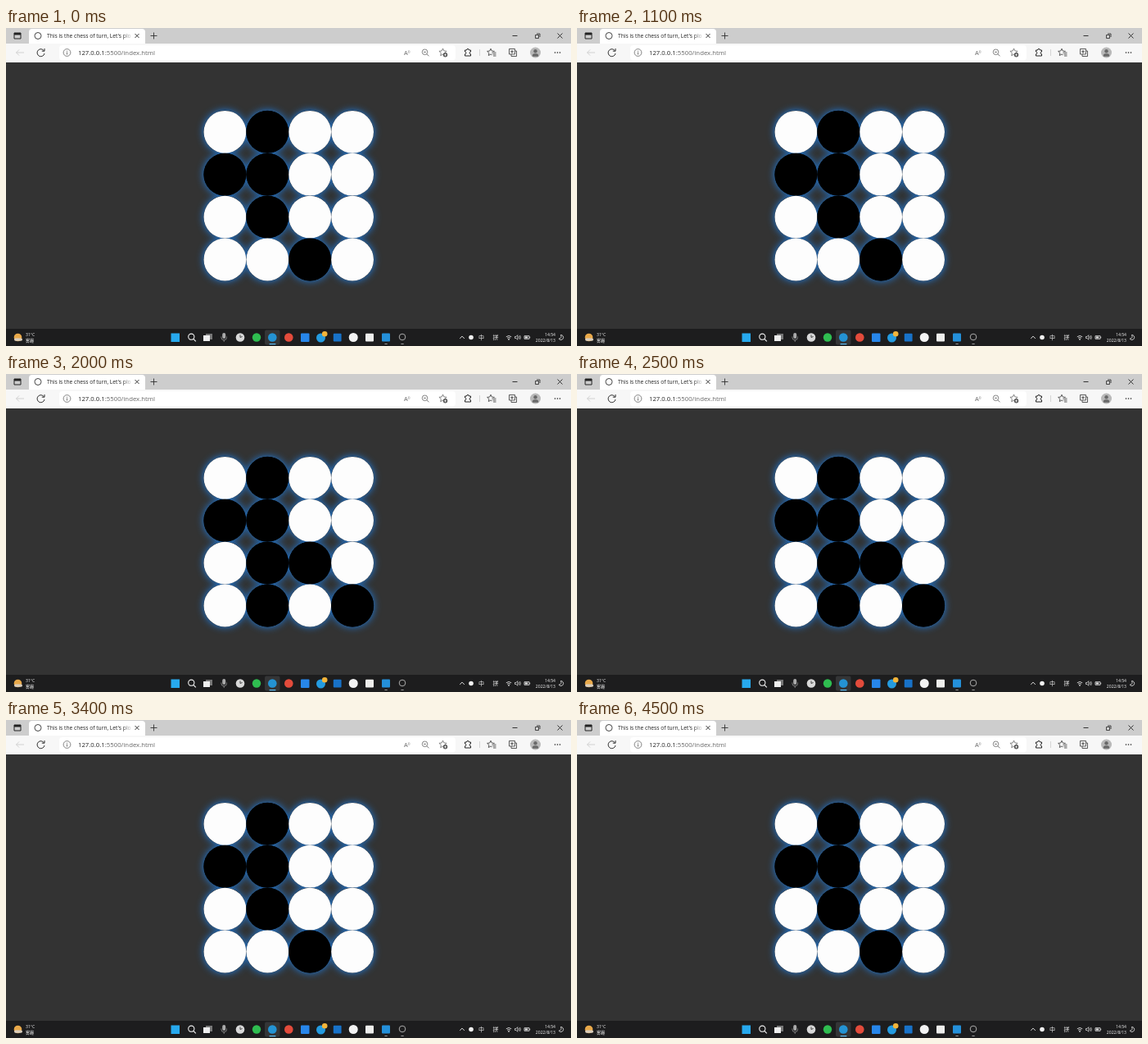
An HTML page with a canvas that plays this animation: 690x388 px, repeating every 5 s.

```html
<!DOCTYPE html>
<html lang="en">
<head>
<meta charset="utf-8">
<title>Chess of turn</title>
<style>
  html, body { margin: 0; width: 100%; height: 100%; overflow: hidden; background: #333; }
  canvas { position: absolute; left: 0; top: 0; }
  span { position: absolute; white-space: pre; line-height: 10px; font-family: "Open Sans", "Noto Sans CJK SC", "Noto Sans CJK", sans-serif; }
  .title { left: 50px; top: 4.5px; width: 103px; overflow: hidden; font-size: 6.7px; color: #222; }
  .title::after { content: ""; position: absolute; right: 0; top: 0; width: 10px; height: 10px; background: linear-gradient(90deg, #fff0, #fffd); }
  .url { left: 88px; top: 25px; font-size: 7.76px; color: #666; }
  .url b { font-weight: 400; color: #222; }
  .read { left: 486px; top: 25px; font-size: 7.5px; color: #666; }
  .bar { color: #f4f4f4; font-size: 5.1px; }
  .ime { color: #f4f4f4; font-size: 7px; top: 372.5px; }
</style>
</head>
<body>
<canvas id="stage" width="690" height="388"></canvas>
<span class="title">This is the chess of turn, Let's plo</span>
<span class="url"><b>127.0.0.1</b>:5500/index.html</span>
<span class="read">A<small>⁾⁾</small></span>
<span class="bar" style="left:24px;top:369px">31°C</span>
<span class="bar" style="left:24px;top:376px">雾霾</span>
<span class="ime" style="left:577px">中</span>
<span class="ime" style="left:594.5px">拼</span>
<span class="bar" style="right:auto;left:640px;width:31px;text-align:right;top:369px">14:54</span>
<span class="bar" style="left:640px;width:31px;text-align:right;top:376px">2022/8/13</span>
<script>
const ctx = document.getElementById("stage").getContext("2d");

function rect(x, y, w, h, color, r = 0) {
  ctx.fillStyle = color;
  ctx.beginPath();
  ctx.roundRect(x, y, w, h, r);
  ctx.fill();
}

function circle(x, y, r, color) {
  ctx.fillStyle = color;
  ctx.beginPath();
  ctx.arc(x, y, r, 0, Math.PI * 2);
  ctx.fill();
}

function ring(x, y, r, color, width = 0.9) {
  ctx.strokeStyle = color;
  ctx.lineWidth = width;
  ctx.beginPath();
  ctx.arc(x, y, r, 0, Math.PI * 2);
  ctx.stroke();
}

// Stroke an SVG path centred on (x, y).
function line(x, y, d, color = "#333", width = 0.9) {
  ctx.save();
  ctx.translate(x, y);
  ctx.strokeStyle = color;
  ctx.lineWidth = width;
  ctx.stroke(new Path2D(d));
  ctx.restore();
}

function star(x, y, r, color) {
  ctx.strokeStyle = color;
  ctx.lineWidth = 0.8;
  ctx.beginPath();
  for (let i = 0; i < 10; i++) {
    const a = i * Math.PI / 5 - Math.PI / 2, k = i % 2 ? r * 0.48 : r;
    ctx.lineTo(x + k * Math.cos(a), y + k * Math.sin(a));
  }
  ctx.closePath();
  ctx.stroke();
}

function drawTabs() {
  rect(0, 0, 690, 20, "#cdcdcd");
  rect(28, 1, 142, 22, "#fff", 4);
  line(14, 9.5, "M-4-3.5H4V3.5H-4Z", "#222", 1);
  rect(10, 6, 8, 2.5, "#222");
  ring(39, 9.5, 4, "#444", 1);
  line(160, 9.5, "M-2.5-2.5L2.5 2.5M2.5-2.5L-2.5 2.5", "#222");
  line(180.5, 9.5, "M-4 0H4M0-4V4", "#333");
  line(621.5, 9.5, "M-3 0H3", "#222");
  line(649, 9.5, "M-2.5-1H1.5V3H-2.5ZM-1-2.5H3V1.5", "#222", 0.8);
  line(676.5, 9.5, "M-3-3L3 3M3-3L-3 3", "#222");
}

function drawToolbar() {
  rect(0, 19, 690, 23, "#f7f7f7");
  rect(65, 21, 484, 18.5, "#fff", 4);
  line(17, 30, "M5 0H-4.5M-1-3.5L-4.5 0L-1 3.5", "#ccc");
  line(42.5, 30, "M4-2A4.5 4.5 0 1 0 4.5 1M4.5-5V-1.8H1.3", "#333", 1);
  ring(74.5, 30, 4.4, "#666", 0.8);
  line(74.5, 30, "M0-2.3V-1.3M0-.5V2.5", "#666");
  ring(511.5, 29.3, 3.3, "#666", 0.8);
  line(511.5, 29.3, "M-1.5 0H1.5M2.4 2.4L5 5", "#666");
  star(533.5, 29.8, 4.8, "#666");
  circle(536.5, 32.8, 2.7, "#555");
  line(536.5, 32.8, "M-1.5 0H1.5M0-1.5V1.5", "#fff", 0.7);
  line(564, 30, "M-3.5-3H-1.5A1.5 1.5 0 0 1 1.5-3H3.5V-1A1.4 1.4 0 0 0 3.5 1.8V4H-3.5V1.8A1.4 1.4 0 0 0-3.5-1Z", "#222", 1);
  line(578.5, 30, "M0-4V4", "#ccc", 0.8);
  star(592, 29.8, 4.6, "#333");
  rect(593.5, 29, 5, 5.5, "#f7f7f7");
  line(596, 31, "M-2.5-1H2.5M-1.5 1H2.5M-1 3H2.5", "#333", 0.8);
  line(619, 30, "M-4.5-4.5H2.5V2H-4.5ZM-2 2V4.5H4.5V-2H2.5M-1-3V.8M-3-1.2H1", "#333", 0.8);
  circle(646.5, 30, 6.5, "#b9b9b9");
  circle(646.5, 28.3, 2.2, "#696969");
  rect(642.8, 31.2, 7.4, 3.5, "#696969", [3, 3, 1, 1]);
  for (const x of [670.5, 673.5, 676.5]) circle(x, 30, 0.8, "#222");
}

function drawTaskbar() {
  const y = 377.5;
  rect(0, 367, 690, 21, "#1d1d1e");
  circle(14.5, y, 4.8, "#e9a94a");
  rect(10, 378.5, 10, 3.2, "#d9cdbd", 1.6);

  rect(316, 368.5, 18.5, 18, "#343536", 2);
  rect(321.5, 385, 8, 1.3, "#5bbcf2", 0.6);
  for (const x of [464, 484]) rect(x - 1.7, 385, 3.5, 1.1, "#999", 0.5);

  rect(201.5, 372.5, 10.5, 10.5, "#27a9ee");
  ring(226.3, 376.7, 3.6, "#eee", 1.1);
  line(226.3, 376.7, "M2.6 2.6L5.5 5.7", "#eee", 1.2);
  rect(244, 373, 8, 7, "#777");
  rect(241, 375, 8, 7, "#eee");
  rect(264.2, 372, 4, 7, "#aaa", 2);
  line(266.2, y, "M-3.3-1V0A3.3 3.3 0 0 0 3.3 0V-1M0 3V5.5", "#888");
  circle(286, y, 5.3, "#d8d8d8");
  line(286, y, "M0-3V0L2.5-1", "#444", 1);
  circle(306, y, 5.2, "#2fbd50");
  circle(325.3, y, 5.3, "#2493d3");
  circle(345.3, y, 5.3, "#e34b3b");
  rect(360, 372.5, 10.5, 10.5, "#2786ea", 1);
  circle(384.5, 378, 5.5, "#249be0");
  circle(389.2, 373.2, 3.3, "#f2b43a");
  rect(399.8, 372.8, 9.8, 9.8, "#1872c8", 1);
  circle(424.2, y, 5.5, "#f3f3f3");
  rect(439, 372.8, 10, 9.8, "#eeeeec", 1);
  rect(459, 372.5, 10, 10, "#2490da", 1);
  ring(484, 377, 3.8, "#aaa", 1);

  line(557, y, "M-2.8 1.4L0-1.4L2.8 1.4", "#eee");
  circle(568, y, 2.8, "#f2f2f2");
  line(614, 378, "M-3.2-1.2Q0-4 3.2-1.2M-2 .3Q0-1.4 2 .3", "#eee", 0.8);
  circle(614, 379.8, 0.9, "#eee");
  line(624.5, y, "M-3-1H-1.5L.3-2.8V2.8L-1.5 1H-3ZM1.7-1.4Q2.8 0 1.7 1.4M3-2.5Q4.8 0 3 2.5", "#eee", 0.7);
  line(636, y, "M-3-1.8H3V1.8H-3ZM3.7-.8V.8", "#eee", 0.8);
  rect(633.8, 376.5, 3.4, 2, "#eee");
  line(678, y, "M-.5-3A3 3 0 1 1-2.8 1.7Q1.3 1 -.5-3Z", "#eee", 0.8);
}

const PAGE = "#333";
const START = ["0100", "1100", "0100", "0010"];
const TURNS = [2000, 2800, 3600, 4400];
const PICK = { row: 3, col: 2 };
const LOOP = 5000;

// Each turn flips the picked disc and its direct neighbours.
function isBlack(row, col, turned) {
  const near = Math.abs(row - PICK.row) + Math.abs(col - PICK.col) <= 1;
  return (START[row][col] === "1") !== (near && turned);
}

function eachDisc(paint) {
  for (let row = 0; row < 4; row++)
    for (let col = 0; col < 4; col++)
      paint(267.4 + col * 51.9, 126.8 + row * 51.9, row, col);
}

function drawBoard(turned) {
  rect(0, 42, 690, 325, PAGE);
  ctx.save();
  ctx.shadowColor = "#1e80e8";
  ctx.shadowBlur = 10;
  eachDisc((x, y) => circle(x, y, 26, "#000"));
  ctx.restore();
  eachDisc((x, y, row, col) =>
    circle(x, y, 25.9, isBlack(row, col, turned) ? "#000" : "#fdfdfd"));
}

drawTabs();
drawToolbar();
drawTaskbar();

const begin = performance.now();
function tick() {
  const t = (performance.now() - begin) % LOOP;
  drawBoard(TURNS.filter(at => t >= at).length % 2 === 1);
  requestAnimationFrame(tick);
}
tick();
</script>
</body>
</html>
```
